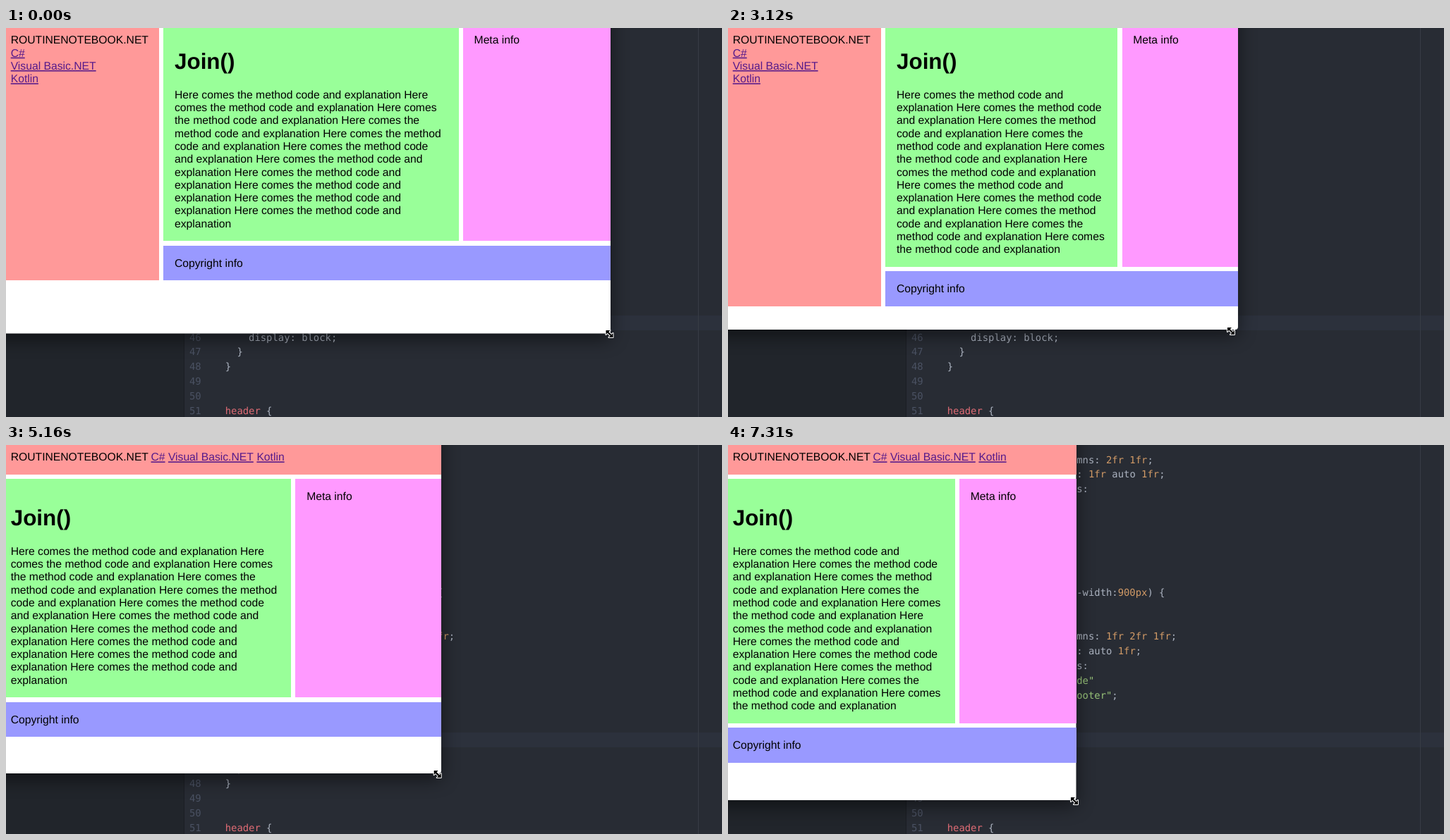
Recreate the animation shown at these times as an HTML page. Size 1015 by 552 pixels, loop 8 s.

```html
<!DOCTYPE html>
<html lang="en">
<head>
<meta charset="utf-8">
<title>Responsive grid resize</title>
<style>
  html, body { margin: 0; width: 100%; height: 100%; overflow: hidden; background: #282c34; }
  svg { display: block; }
  text { white-space: pre; text-rendering: geometricPrecision; }
  .page text { font: 15.7px "Liberation Sans", Helvetica, Arial, sans-serif; }
  .page .title { font-size: 31.4px; font-weight: bold; }
  .page .link { fill: #551a8b; text-decoration: underline; }
  .code text { font: 13.87px "DejaVu Sans Mono", Menlo, monospace; fill: #abb2bf; }
  .code .num { fill: #4b5263; }
  .code .n { fill: #d19a66; }
  .code .s { fill: #98c379; }
  .code .t { fill: #e06c75; }
  #shadow { filter: blur(13px); }
</style>
</head>
<body>
<svg width="1015" height="552" viewBox="0 0 1015 552">
  <rect width="1015" height="552" fill="#282c34"/>
  <rect width="253" height="552" fill="#21252b"/>
  <rect x="252" width="1" height="552" fill="#1b1e24"/>
  <rect x="253" y="408" width="762" height="21" fill="#2c313c"/>
  <rect x="981" width="1" height="552" fill="#383c45"/>
  <g class="code" id="code"></g>
  <rect id="shadow" x="-60" y="-60" fill="#000" opacity=".52"/>
  <g class="page">
    <rect id="win" x="-20" y="-20" rx="4" fill="#fff"/>
    <rect id="nav" fill="#f99"/>
    <rect id="main" fill="#9f9"/>
    <rect id="meta" fill="#f9f"/>
    <rect id="foot" fill="#99f"/>
    <text id="brand" x="6.7" y="22.4">ROUTINENOTEBOOK.NET</text>
    <text class="link">C#</text>
    <text class="link">Visual Basic.NET</text>
    <text class="link">Kotlin</text>
    <text class="title" id="title">Join()</text>
    <g id="copy"></g>
    <text id="metaText">Meta info</text>
    <text id="footText">Copyright info</text>
  </g>
  <path id="cursor" d="M-4.8-5H1L-1.2-2.8L2.8 1.2L5-1V5H-1L1.2 2.8L-2.8-1.2L-5 1V-5Z"
    fill="#000" stroke="#fff" stroke-width="2" paint-order="stroke" stroke-linejoin="round"/>
</svg>
<script>
const NS = "http://www.w3.org/2000/svg";
const LOOP = 8000, PAD = 15.7, GAP = 6.3, LINE = 18.3, ASCENT = 14.5, LEFT = -9, NAV_RIGHT = 217, BREAK = 709;
const $ = id => document.getElementById(id);
const set = (el, attrs) => { for (const k in attrs) el.setAttribute(k, attrs[k]); };
const make = (parent, tag, attrs, text = "") => {
  const el = document.createElementNS(NS, tag);
  set(el, attrs);
  el.textContent = text;
  return parent.appendChild(el);
};

// Editor rows: line number, then runs of "class|text"
const rows = [
  [26, "|    grid-template-columns: ", "n|2fr 1fr", "|;"],
  [27, "|    grid-template-rows: ", "n|1fr", "| auto ", "n|1fr", "|;"],
  [28, "|    grid-template-areas:"],
  [35, "|@media screen and (min-width:", "n|900px", "|) {"],
  [38, "|    grid-template-columns: ", "n|1fr 2fr 1fr", "|;"],
  [39, "|    grid-template-rows: ", "|auto ", "n|1fr", "|;"],
  [40, "|    grid-template-areas:"],
  [41, "s|      \"header main aside\""],
  [42, "s|      \"header footer footer\"", "|;"],
  [46, "|    display: block;"],
  [47, "|  }"],
  [48, "|}"],
  [49], [50],
  [51, "t|header", "| {"]
];
for (const [num, ...runs] of rows) {
  const y = 443.5 + (num - 46) * 20.9;
  make($("code"), "text", { x: 260, y, class: "num" }, num);
  const row = make($("code"), "text", { x: 310.7, y });
  for (const run of runs) {
    const [cls, text] = run.split("|");
    make(row, "tspan", { class: cls }, text);
  }
}

// Word wrap
const pen = document.createElement("canvas").getContext("2d");
pen.font = '100px "Liberation Sans", Helvetica, Arial, sans-serif';
const widthOf = text => pen.measureText(text).width * 0.157;
const words = "Here comes the method code and explanation ".repeat(11).trim().split(" ");
function wrap(width) {
  const lines = [];
  let line = "";
  for (const word of words) {
    const longer = line ? line + " " + word : word;
    if (line && widthOf(longer) > width) {
      lines.push(line);
      line = word;
    } else line = longer;
  }
  return lines.concat(line);
}
const copyLines = Array.from({ length: 18 }, () => make($("copy"), "text", {}));
const links = document.querySelectorAll(".link");

// Screen refreshes come in runs: first, last, count
const runs = [
  [780, 1520, 9], [1610, 2410, 10], [2500, 3210, 9], [3330, 4120, 10], [4210, 4980, 10],
  [5070, 5810, 9], [5900, 6680, 10], [6770, 7130, 5], [7310, 7310, 1]
];
function snap(t) {
  let at = 0;
  for (const [first, last, count] of runs) {
    if (t < first) break;
    const step = (last - first) / (count - 1 || 1);
    at = first + step * Math.min(count - 1, Math.floor((t - first) / (step || 1) + 0.16));
  }
  return at;
}

// Time, window right and bottom, pointer offset from that corner
const keys = [
  [690, 857, 433.5, -1.5, 0.5], [1520, 817, 424, -6, 0.5], [1966, 790, 424, -13, 0.5],
  [2410, 757, 425, -8, 1], [3121, 723, 428, -10, 2], [3210, 716, 430, -9, 2],
  [3593, 695, 439, -7, 2], [4120, 663, 453.5, -4, 1], [4467, 656, 454.5, -3.5, 0.5],
  [4980, 628, 461.5, -5, 1], [5810, 578, 482.5, -6.5, 1], [6680, 506, 503, -5, 1],
  [7130, 497, 504, -3, 1], [7310, 493.5, 504, -2.5, 1]
];
function pose(t) {
  const i = keys.findIndex(k => k[0] >= t);
  if (i < 1) return keys[i < 0 ? keys.length - 1 : 0].slice(1);
  const a = keys[i - 1], b = keys[i], f = (t - a[0]) / (b[0] - a[0]);
  return a.slice(1).map((v, j) => v + (b[j + 1] - v) * f);
}

function box(id, x0, y0, x1, y1) {
  const [x, y, r, b] = [x0, y0, x1, y1].map(Math.round);
  set($(id), { x, y, width: r - x, height: b - y });
}

function draw(t) {
  const [right, bottom, dx, dy] = pose(snap(t));
  const wide = right > BREAK;
  const mainX = wide ? NAV_RIGHT + GAP : LEFT;
  const mainW = (right - mainX - GAP) * 2 / 3;
  const metaX = mainX + mainW + GAP;
  const top = wide ? -8 : 48;
  const lines = wrap(mainW - 2 * PAD);
  const firstLine = top + 93.2;
  const mainEnd = firstLine + lines.length * LINE + PAD;
  const footY = mainEnd + GAP;
  const footEnd = footY + LINE + 2 * PAD;

  set($("win"), { width: right + 20, height: bottom + 20 });
  set($("shadow"), { width: right + 60, height: bottom + 68 });
  box("nav", LEFT, -8, wide ? NAV_RIGHT : right, wide ? footEnd : 41.7);
  box("main", mainX, top, mainX + mainW, mainEnd);
  box("meta", metaX, top, right, mainEnd);
  box("foot", mainX, footY, right, footEnd);

  const textX = mainX + PAD;
  links.forEach((link, i) => set(link, wide
    ? { x: 6.7, y: 22.4 + LINE * (i + 1) }
    : { x: [205.5, 229.9, 355.4][i], y: 22.4 }));
  set($("title"), { x: textX, y: top + 65.6 });
  copyLines.forEach((el, i) => {
    el.textContent = lines[i] || "";
    set(el, { x: textX, y: firstLine + ASCENT + i * LINE });
  });
  set($("metaText"), { x: metaX + PAD, y: top + PAD + ASCENT });
  set($("footText"), { x: textX, y: footY + PAD + ASCENT });
  set($("cursor"), { transform: `translate(${right + dx} ${bottom + dy})` });
}

const start = performance.now();
function tick() {
  draw((performance.now() - start) % LOOP);
  requestAnimationFrame(tick);
}
tick();
</script>
</body>
</html>
```
